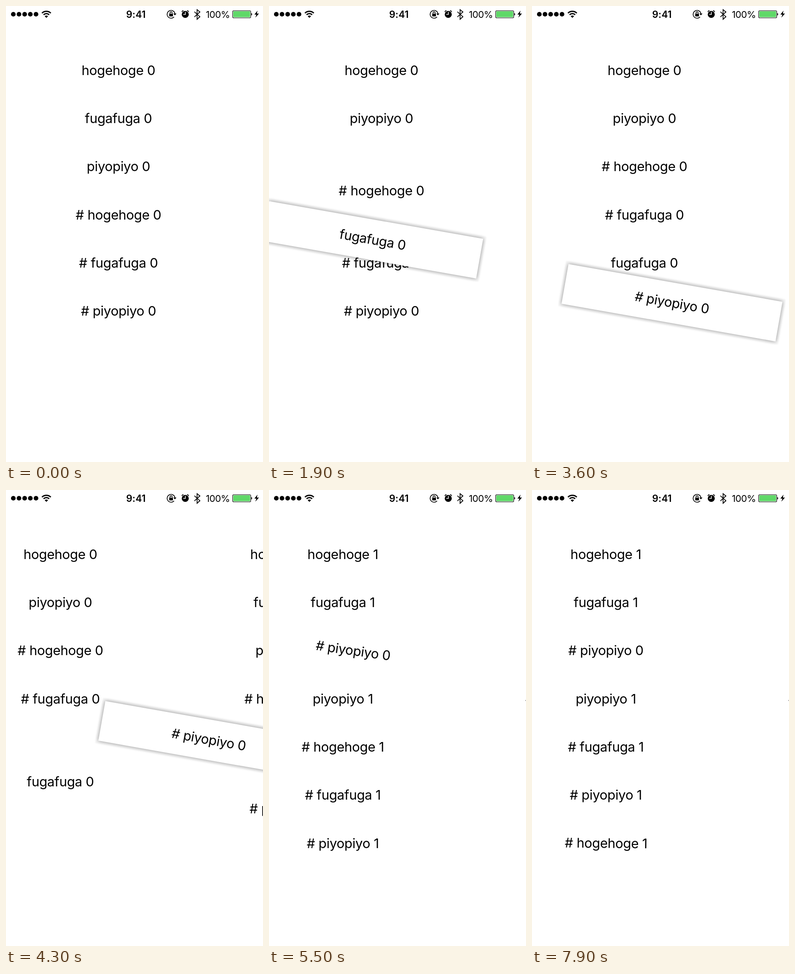
Recreate the animation shown at these times as an HTML page. Size 562x997 px, loop 8000 ms.

```html
<!DOCTYPE html>
<html lang="en">
<head>
<meta charset="utf-8">
<title>Drag and drop list</title>
<style>
  html, body { margin: 0; width: 100%; height: 100%; overflow: hidden; background: #fff; }
  body { position: relative; color: #000; font-family: Inter, Roboto, sans-serif; font-optical-sizing: none; }
  .cell {
    position: absolute; left: 0; top: 0; width: 475px; height: 88.3px;
    margin: -44.15px 0 0 -237.5px;
    font-size: 29px; line-height: 88.3px; letter-spacing: -.36px;
    text-align: center; white-space: nowrap;
  }
  .lifted { z-index: 1; background: #fff; }
  .shadow { box-shadow: 0 0 8px rgba(0, 0, 0, .4), 0 0 3px 6px rgba(0, 0, 0, .05); }
  svg { position: absolute; left: 0; top: 0; z-index: 2; }
</style>
</head>
<body>
<svg width="562" height="36" viewBox="0 0 562 36">
  <g id="signal"></g>
  <path d="M78.6 15.6a13.6 13.6 0 0 1 19.4 0M82.2 19.2a8.6 8.6 0 0 1 12.2 0" fill="none" stroke="#000" stroke-width="2.7"/>
  <path d="M84.6 22.2a5.2 5.2 0 0 1 7.4 0l-3.7 3.8z"/>
  <text x="284.2" y="25.8" font-size="21" font-weight="600" letter-spacing=".1" text-anchor="middle">9:41</text>

  <path d="M367.5 23.8a8.6 8.6 0 1 1 2-6.8" fill="none" stroke="#000" stroke-width="1.5"/>
  <path d="M365.8 16.6h7l-3.5 4z"/>
  <rect x="357" y="16.8" width="8" height="6" rx=".8"/>
  <path d="M358.6 17v-1.8a2.4 2.4 0 0 1 4.8 0V17" fill="none" stroke="#000" stroke-width="1.4"/>

  <circle cx="392" cy="18.4" r="7.7"/>
  <path d="M384.6 13.2a4 4 0 0 1 3.6-3.2M399.4 13.2a4 4 0 0 0-3.6-3.2" fill="none" stroke="#000" stroke-width="1.6"/>
  <path d="M392.2 13v5.4h-4.6" fill="none" stroke="#fff" stroke-width="1.5"/>

  <path d="M412 12.6l12 10.8-6.2 5.6V8l6.2 5-12 10.8" fill="none" stroke="#000" stroke-width="1.7"/>
  <text x="463.2" y="25.8" font-size="20.6" letter-spacing="-.6" text-anchor="middle">100%</text>

  <rect x="495.6" y="10.2" width="39.6" height="15.8" rx="2.6" fill="#fff" stroke="#000" stroke-width="1.1"/>
  <rect x="497" y="11.6" width="36.8" height="13" rx="1.4" fill="#5fd868"/>
  <path d="M536.4 15.3q1.9.5 1.9 2.8t-1.9 2.8z"/>
  <path d="M550 10l-6.8 8.8h4.4l-2.4 6.8 8-9.2h-4.6z"/>
</svg>
<script>
const LOOP = 8000, STEP = 100, SHIFT = 300, TILT = 10;
const FIRST_X = 245.9, COLUMN = 492.6, FIRST_Y = 140.7, ROW = 105.3;
const LIFT = { x: -8, y: 26 };
const names = ['hogehoge', 'fugafuga', 'piyopiyo', '# hogehoge', '# fugafuga', '# piyopiyo'];

// Each drag: key points of the finger, and the slots the cell takes on its way
const drags = [
  {
    label: 'fugafuga 0', lift: 1300, start: 1300, drop: 2150, settle: 400,
    path: [{ t: 1500, x: 211, y: 276 }, { t: 2000, x: 230, y: 570 }, { t: 2100, x: 237, y: 540 }],
    slots: [{ time: 1600, column: 0, row: 2 }, { time: 1750, column: 0, row: 3 }, { time: 1900, column: 0, row: 4 }]
  },
  {
    label: '# piyopiyo 0', lift: 3100, start: 3400, drop: 5350, settle: 300,
    path: [{ t: 4000, x: 441, y: 560 }, { t: 4300, x: 443, y: 546 }, { t: 5300, x: 278, y: 351 }],
    slots: [{ time: 3800, column: 1, row: 4 }, { time: 4105, column: 0, row: 4 },
      { time: 4500, column: 1, row: 3 }, { time: 4800, column: 1, row: 2 }]
  },
  {
    label: '# hogehoge 1', lift: 6500, start: 6500, drop: 7700, settle: 205,
    path: [{ t: 6900, x: 142.5, y: 574 }, { t: 7400, x: 150, y: 743 }],
    slots: [{ time: 6950, column: 1, row: 5 }, { time: 7100, column: 1, row: 6 }]
  }
];

const clamp = p => Math.min(1, Math.max(0, p));
const mix = (a, b, p) => a + (b - a) * p;
const smooth = p => p * p * (3 - 2 * p);
const easeIn = p => p ** 2.4;
const easeOut = p => 1 - easeIn(1 - p);
const scrollAt = t => 577 * clamp((t - 4046) / 1154);

const columns = [0, 1, 2].map(column => names.map((name, row) => {
  const el = document.createElement('div');
  el.textContent = `${name} ${column}`;
  document.body.append(el);
  return { el, history: [{ time: -SHIFT, column, row }] };
}));
const cells = columns.flat();

// Taking a slot pushes the neighbours along; every cell records where it went
function moveTo(cell, { time, column, row }) {
  const from = columns.find(list => list.includes(cell));
  from.splice(from.indexOf(cell), 1);
  columns[column].splice(row, 0, cell);
  columns.forEach((list, c) => list.forEach(({ history }, r) => {
    const last = history.at(-1);
    if (last.column !== c || last.row !== r) history.push({ time, column: c, row: r });
  }));
}

for (const drag of drags) {
  const cell = cells.find(({ el }) => el.textContent === drag.label);
  cell.drag = drag;
  drag.slots.forEach(slot => moveTo(cell, slot));
}

function homeAt({ history }, t) {
  const i = Math.max(0, history.findLastIndex(entry => entry.time <= t));
  const now = history[i], before = history[Math.max(0, i - 1)];
  const p = smooth(clamp((t - now.time) / SHIFT));
  return {
    x: FIRST_X + mix(before.column, now.column, p) * COLUMN - scrollAt(t),
    y: FIRST_Y + mix(before.row, now.row, p) * ROW
  };
}

function fingerAt(cell, t) {
  const { start, path } = cell.drag;
  const home = homeAt(cell, start);
  let a = { t: start, x: home.x + LIFT.x, y: home.y + LIFT.y };
  for (const b of path) {
    if (t < b.t) {
      const p = clamp((t - a.t) / (b.t - a.t));
      return { x: mix(a.x, b.x, p), y: mix(a.y, b.y, p) };
    }
    a = b;
  }
  return a;
}

function place(cell, t) {
  const { el, drag } = cell;
  const lifted = drag && t >= drag.lift && t < drag.drop + drag.settle;
  let { x, y } = homeAt(cell, t), angle = 0;
  if (lifted) {
    const p = clamp((t - drag.drop) / drag.settle);
    const finger = fingerAt(cell, t);
    x = mix(finger.x, x, easeOut(p));
    y = mix(finger.y, y, easeOut(p));
    angle = TILT * (1 - easeIn(p));
  }
  el.className = 'cell' + (lifted ? ' lifted' : '') + (lifted && t <= drag.drop ? ' shadow' : '');
  el.style.transform = `translate(${x}px, ${y}px) rotate(${angle}deg)`;
}

document.getElementById('signal').innerHTML =
  [0, 1, 2, 3, 4].map(i => `<circle cx="${16 + i * 12.4}" cy="18" r="5.1"/>`).join('');

const begin = performance.now();
function draw() {
  const elapsed = performance.now() - begin + 20;
  const t = Math.floor(elapsed / STEP) * STEP % LOOP;
  cells.forEach(cell => place(cell, t));
  requestAnimationFrame(draw);
}
draw();
</script>
</body>
</html>
```
